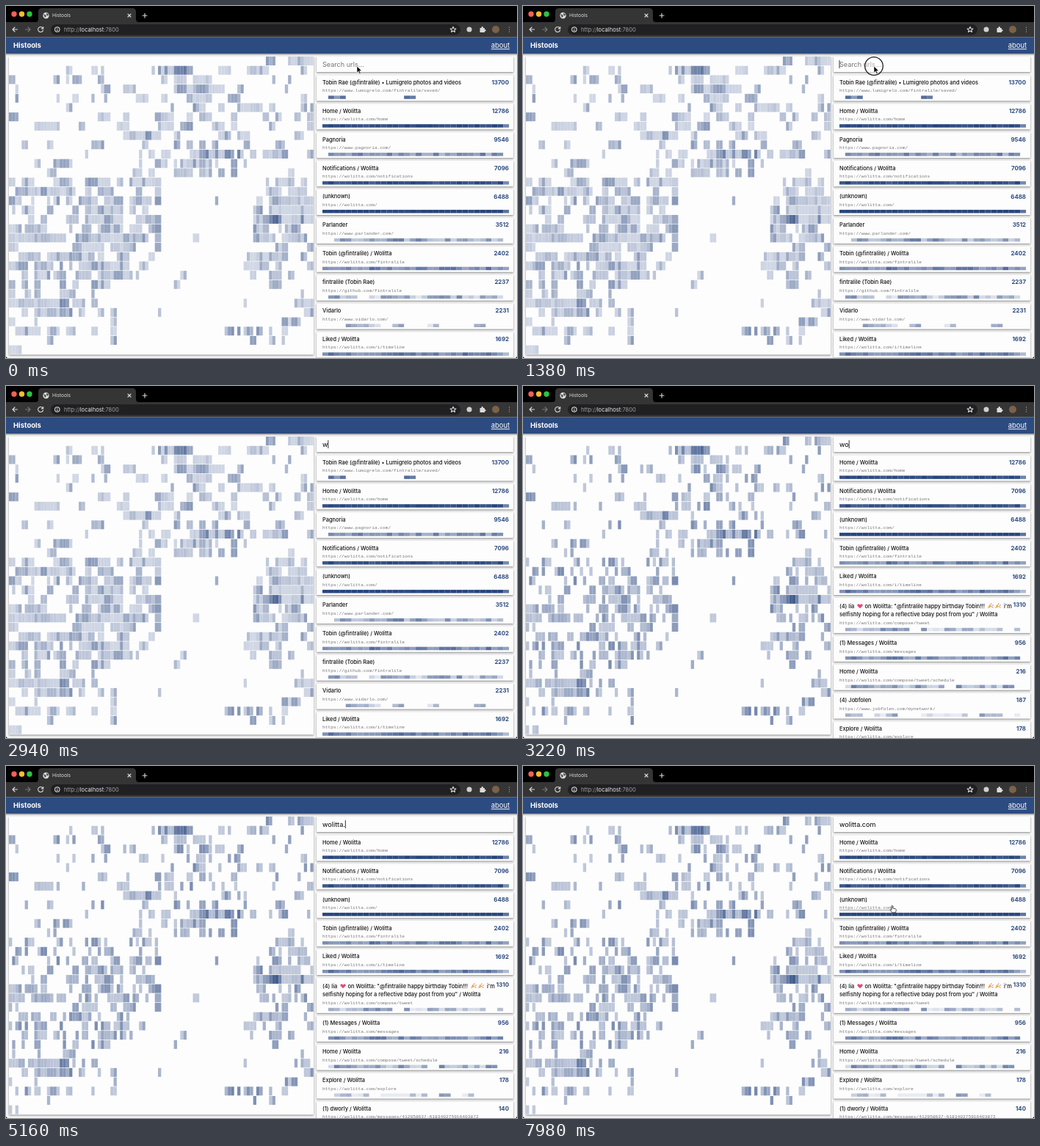
Animation, 696 px wide and 480 px high, one loop 8 s. Source, as an HTML page:

```html
<!DOCTYPE html>
<html lang="en">
<head>
<meta charset="utf-8">
<title>Histools</title>
<style>
  html, body { margin: 0; width: 100%; height: 100%; overflow: hidden; background: #000; }
  svg { display: block; width: 696px; height: 480px; }
  text { font-family: Inter, "Open Sans", sans-serif; white-space: pre; }
  .card { fill: #fdfdfd; filter: drop-shadow(0 1px 1.3px #0007); }
  .title { font-size: 7.45px; font-weight: 500; fill: #111; }
  .count { font-size: 7.9px; font-weight: 700; fill: #2c4b80; text-anchor: end; }
  .url { font: 6.22px "Liberation Mono", monospace; fill: #777; }
  .url.hover { text-decoration: underline; }
  .icon { fill: none; stroke: #dcdcdc; stroke-width: 1.1; stroke-linecap: round; stroke-linejoin: round; }
</style>
</head>
<body>
<svg viewBox="0 0 696 480">
  <rect width="696" height="480" rx="3" fill="#f5f5f5"/>

  <!-- Browser frame -->
  <rect width="696" height="23"/>
  <circle cx="11" cy="11" r="3.7" fill="#fb5f56"/>
  <circle cx="21.5" cy="11" r="3.7" fill="#fcbc30"/>
  <circle cx="32" cy="11" r="3.7" fill="#2ac640"/>
  <path d="M40 22q4 0 4-4V8q0-5 5-5h123q5 0 5 5v10q0 4 4 4z" fill="#353535"/>
  <rect y="22" width="696" height="20.5" fill="#353535"/>
  <circle cx="54.5" cy="13" r="4.2" fill="#dedede"/>
  <path d="M51 11l3 1 1 2-2 2zM55 9.5l3 1.5-1 3-2-2z" fill="#565656"/>
  <text x="63" y="15.3" font-size="6.6" fill="#dedede">Histools</text>
  <path class="icon" d="M166 11l4 4m0-4l-4 4M186 13h6m-3-3v6"/>
  <rect x="61" y="25" width="558" height="14.5" rx="7.2" fill="#202022"/>
  <path class="icon" d="M15.5 32H9m3-3l-3 3 3 3M50.300 30.5a3.5 3.5 0 1 0 .2 2.5M50.700 28.5v2.400h-2.400"/>
  <path class="icon" d="M26.5 32H33m-3-3l3 3-3 3" opacity=".4"/>
  <circle class="icon" cx="69.8" cy="32" r="3.2"/>
  <path class="icon" d="M69.8 32v1.7m0-3.4v.1"/>
  <text x="79" y="34.8" font-size="7.6" fill="#a0a0a0">http://<tspan fill="#e8e8e8">localhost</tspan>:7800</text>
  <path class="icon" d="M609 28.2l1.100 2.600 2.800.2-2.100 1.800.7 2.700-2.500-1.500-2.500 1.500.7-2.700-2.100-1.800 2.800-.2z"/>
  <circle cx="631" cy="32" r="3.5" fill="#d0d0d0"/>
  <path d="M645.5 30h2v-.7a1.200 1.200 0 0 1 2.400 0v.7h2v2h.5a1.200 1.200 0 0 1 0 2.400h-.5V36h-6.400z" fill="#dcdcdc"/>
  <circle cx="667" cy="32" r="5" fill="#7b6248"/>
  <path class="icon" d="M685.5 29v.01M685.5 32v.01M685.5 35v.01"/>

  <!-- Page header -->
  <rect y="42.5" width="696" height="22.8" fill="#2c4b80"/>
  <rect y="65.3" width="696" height="1.7" fill="#b8b8b8"/>
  <text x="10" y="57.3" font-size="9.5" font-weight="700" fill="#fff">Histools</text>
  <text x="686" y="57.3" font-size="9.4" fill="#fff" text-anchor="end" text-decoration="underline">about</text>

  <rect class="card" x="4" y="69" width="415" height="406.5"/>
  <g id="views"></g>

  <rect class="card" x="423" y="69" width="268" height="21"/>
  <text id="field" x="431" y="82.9" font-size="9.1"></text>
  <rect id="caret" y="74" width=".8" height="11"/>
  <circle id="ring" cx="478" cy="82" r="12.3" fill="#fff" fill-opacity=".4" stroke="#222" stroke-width="1.3"/>
  <path id="arrow" d="M0 0v9l2.100-1.900 1.500 3.300 1.500-.7-1.500-3.200h2.900z" stroke="#fff" stroke-width=".6"/>
  <path id="hand" d="M-1 .8q1-1.200 1.700.2v3l3.600.8q1.300.5 1 2l-.8 3H-.5L-3 6.300q0-1.400 2 0z" fill="#fff" stroke="#222" stroke-width=".8"/>
</svg>

<script>
const $ = id => document.getElementById(id);
const clamp = v => Math.max(0, Math.min(1, v));
const mix = (a, b, k) => a + (b - a) * k;
const smooth = k => k * k * (3 - 2 * k);
const hash = (a, b) => {
  const s = Math.sin(a * 127.1 + b * 311.7) * 43758.5453;
  return s - Math.floor(s);
};
// Smooth random curve along x, a different one for each row
const noise = (row, x) => {
  const i = Math.floor(x);
  return mix(hash(row, i), hash(row, i + 1), smooth(x - i));
};

const LIGHT = [232, 235, 243], DARK = [38, 68, 124];
const tint = v => `rgb(${LIGHT.map((l, i) => Math.round(mix(l, DARK[i], clamp(v))))})`;
const cell = (x, y, w, h, v) =>
  `<rect x="${x.toFixed(2)}" y="${y.toFixed(2)}" width="${w}" height="${h}" fill="${tint(v)}"/>`;

const DAYS = 32, SLOTS = 96, SLOT_W = 4.32, DAY_H = 12.7;
const HOTSPOTS = [[1.4, 235], [8, 178], [10, 290], [17, 373], [26.5, 60], [29, 297]];
const heat = (day, x) => Math.max(...HOTSPOTS.map(([d, hx]) =>
  Math.exp(-(((x - hx) / 28) ** 2) - ((day - d) / .7) ** 2)));

// How likely a slot is active; the empty wedge is the sleeping time
function activity(day, x) {
  if (day === 0) return x > 350 ? .7 : 0;
  if (day === DAYS - 1) return x < 32 ? .4 : 0;
  if (day < 13) return x < 190 ? .33 : x < 330 ? .45 : day < 11 ? .42 : .03;
  const bedtime = 208 - 60 * clamp((day - 21) / 4);
  const wake = day < 15 ? 350 : 335 - 15 * clamp((day - 19) / 3);
  if (x > bedtime && x < wake) return 0;
  return day < 24 ? .62 : .42;
}

function heatmap(keep, lift) {
  let out = "";
  for (let day = 0; day < DAYS; day++) {
    for (let slot = 0; slot < SLOTS; slot++) {
      const x = 4 + slot * SLOT_W, hot = heat(day, x);
      const chance = activity(day, x) + .8 * hot;
      const run = .5 * noise(day + 3, slot / 6) + .5 * hash(day + 70, slot >> 1);
      if (run > .12 + .7 * chance || hash(day + 50, slot) > keep + hot) continue;
      const shade = hash(day + 9, Math.floor(slot * .7));
      out += cell(x, 69 + day * DAY_H, SLOT_W, 12, lift + .38 * shade * shade + .3 * hot * shade);
    }
  }
  return out;
}

// title, url, visits, bar shade, share of the bar that is filled
const saved = ["Tobin Rae (@fintralile) • Lumigrelo photos and videos", "https://www.lumigrelo.com/fintralile/saved/", 13700, .6, .12];
const home = ["Home / Wolitta", "https://wolitta.com/home", 12786, .95, 1];
const social = ["Pagnoria", "https://www.pagnoria.com/", 9546, .5, .99];
const notices = ["Notifications / Wolitta", "https://wolitta.com/notifications", 7096, .9, 1];
const unknown = ["(unknown)", "https://wolitta.com/", 6488, 1, 1];
const chat = ["Parlander", "https://www.parlander.com/", 3512, .4, .85];
const profile = ["Tobin (@fintralile) / Wolitta", "https://wolitta.com/fintralile", 2402, .6, 1];
const code = ["fintralile (Tobin Rae)", "https://github.com/fintralile", 2237, .3, .97];
const video = ["Vidarlo", "https://www.vidarlo.com/", 2231, .32, .5];
const liked = ["Liked / Wolitta", "https://wolitta.com/i/timeline", 1692, .6, 1];
const wish = ["(4) lia", "https://wolitta.com/compose/tweet", 1310, .3, .85];
const messages = ["(1) Messages / Wolitta", "https://wolitta.com/messages", 956, .5, .98];
const schedule = ["Home / Wolitta", "https://wolitta.com/compose/tweet/schedule", 216, .35, .7];
const network = ["(4) Jobfolen", "https://www.jobfolen.com/mynetwork/", 187, .15, .7];
const explore = ["Explore / Wolitta", "https://wolitta.com/explore", 178, .15, .6];
const direct = ["(1) dworly / Wolitta", "https://wolitta.com/messages/412058637-618340275916403872", 140, .3, .8];

const label = (cls, x, y, s) => `<text class="${cls}" x="${x}" y="${y}">${s}</text>`;
const popper = (x, y) =>
  `<path d="M${x} ${y}l2.500-5.500 3 3z" fill="#e3b23c"/>` +
  `<path d="M${x + 4} ${y - 5}l1-2m.8 3.200l2-.8m-2.300 2.600l2 .9" stroke="#d35a78" stroke-width=".9"/>`;

function wishExtras(top) {
  const y = top + 14.4;
  return `<path d="M459 ${y}l-3.500-3.500q-.5-2.700 2-2.500l1.500 1.200 1.500-1.200q2.800 0 2 2.500z" fill="#e8487c"/>` +
    label("title", 465.5, y, 'on Wolitta: "@fintralile happy birthday Tobin!!!') +
    popper(633, y) + popper(643, y) + label("title", 655, y, "i'm") +
    label("title", 431, top + 25.3, 'selfishly hoping for a reflective bday post from you" / Wolitta');
}

function bar(y, seed, shade, fill) {
  let out = "";
  for (let i = 0; i < DAYS; i++) {
    const edge = i === 0 || i === DAYS - 1;
    if (fill < 1 && (edge || hash(seed, i >> 1) > fill)) continue;
    const swing = (1.15 - shade) * .7 * (hash(seed, i + 60) - .5);
    out += cell(431 + i * 7.94, y, 7.94, 4.5, shade + swing - (i === DAYS - 1 ? .3 : 0));
  }
  return out;
}

function list(items) {
  let top = 94.4;
  return items.map(item => {
    const [title, url, visits, shade, fill] = item;
    const extra = item === wish ? 13 : 0;
    const out = `<rect class="card" x="423" y="${top}" width="268" height="${35 + extra}"/>` +
      label("title", 431, top + (extra ? 14.4 : 12.4), title) +
      (extra ? wishExtras(top) : "") +
      label("count", 685, top + 12.5, visits) +
      label("url", 431, top + 22.9 + extra, url) +
      bar(top + 27.9 + extra, visits, shade, fill);
    top += 38.9 + extra;
    return out;
  }).join("");
}

const matches = [home, notices, unknown, profile, liked, wish, messages, schedule];
const views = [
  heatmap(1, .12) + list([saved, home, social, notices, unknown, chat, profile, code, video, liked]),
  heatmap(.74, .2) + list([...matches, network, explore]),
  heatmap(.72, .2) + list([...matches, explore, direct])
];
$("views").innerHTML = views.map(v => `<g>${v}</g>`).join("");
const groups = [...$("views").children];
const hoverLink = groups[2].querySelectorAll(".url")[2];

const QUERY = "wolitta.com";
const CLICK = 1300, FIRST_KEY = 2900, KEY_GAP = 310, MOVE = 6800, ARRIVE = 7500, LOOP = 8000;

const show = (el, on) => el.setAttribute("visibility", on ? "visible" : "hidden");

function render(t) {
  const typed = Math.max(0, Math.min(QUERY.length, 1 + Math.floor((t - FIRST_KEY) / KEY_GAP)));
  const view = typed < 2 ? 0 : typed === 2 ? 1 : 2;
  groups.forEach((g, i) => g.setAttribute("display", i === view ? "inline" : "none"));

  const field = $("field");
  field.textContent = typed ? QUERY.slice(0, typed) : "Search urls...";
  field.setAttribute("fill", typed ? "#000" : "#757575");

  const lastInput = typed ? FIRST_KEY + (typed - 1) * KEY_GAP : CLICK;
  show($("caret"), t >= CLICK && (t - lastInput) % 1000 < 500);
  $("caret").setAttribute("x", typed ? 431 + field.getComputedTextLength() : 430.6);
  show($("ring"), t >= CLICK && t < CLICK + 160);

  const way = smooth(clamp((t - MOVE) / (ARRIVE - MOVE)));
  const x = mix(478, 503, way), y = mix(82, 190, way);
  const pointing = y > 187;
  for (const id of ["arrow", "hand"]) $(id).setAttribute("transform", `translate(${x} ${y})`);
  show($("arrow"), !pointing && (t < FIRST_KEY || t >= MOVE));
  show($("hand"), pointing);
  hoverLink.classList.toggle("hover", pointing);
}

const start = performance.now();
function tick() {
  render((performance.now() - start) % LOOP);
  requestAnimationFrame(tick);
}
tick();
</script>
</body>
</html>
```
